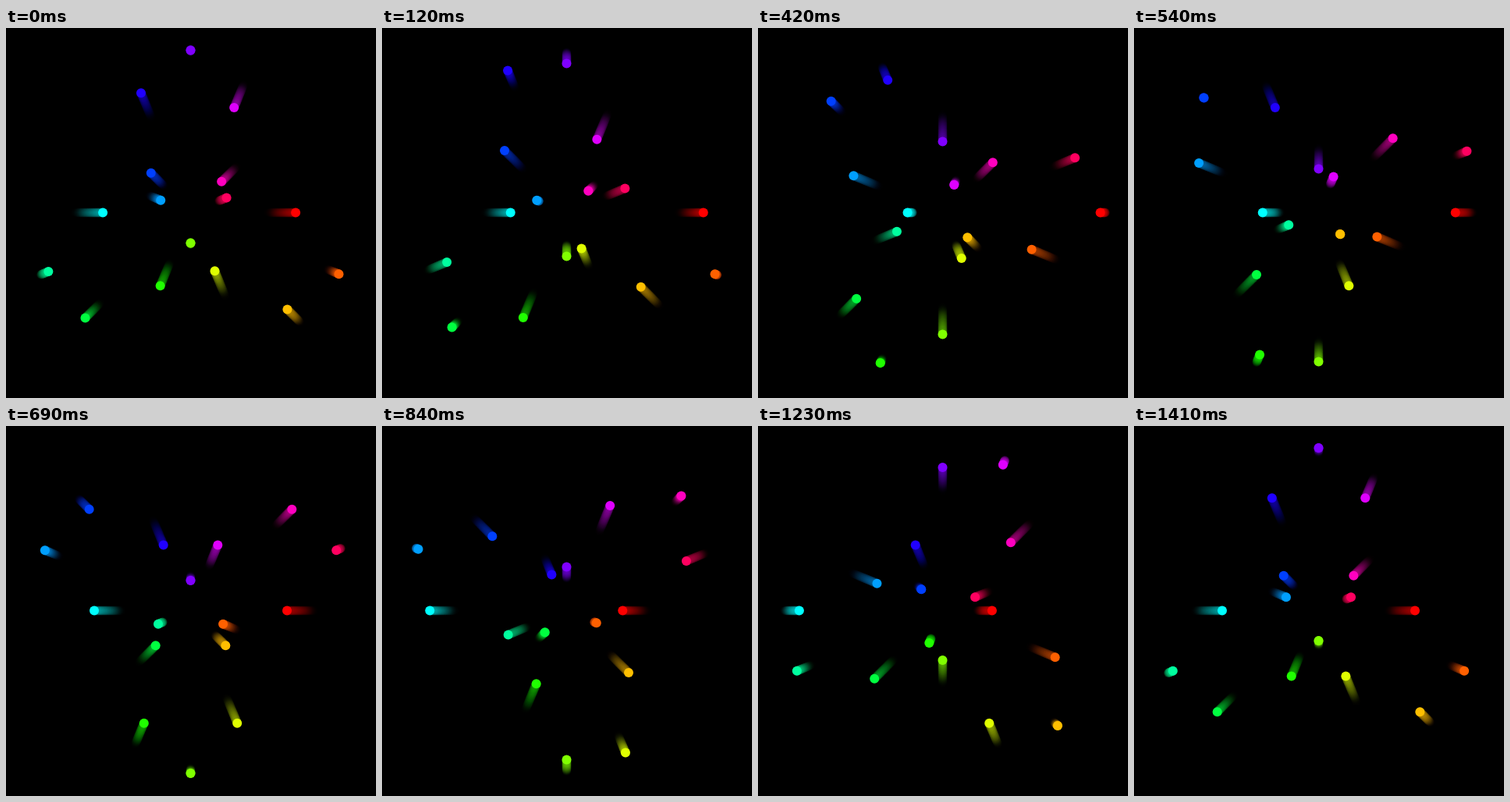
These frames come from a looping animation (474x474 px, 1.44 s). An HTML page with a canvas:

```html
<!DOCTYPE html>
<html lang="en">
<head>
<meta charset="utf-8">
<title>Pulsing ring of dots</title>
<style>
  html, body { margin: 0; width: 100%; height: 100%; overflow: hidden; background: #000; }
  canvas { display: block; width: 474px; height: 474px; }
</style>
</head>
<body>
<canvas id="stage" width="474" height="474"></canvas>
<script>
const ctx = document.getElementById('stage').getContext('2d');
const TAU = Math.PI * 2;
const SIZE = 474, CENTER = 236.5;
const LOOP = 1440, STEP = 30;
const DOTS = 16, DOT_RADIUS = 6;
const MEAN = 123.5, SWING = 85;
const TRAIL_MS = 100, TRAIL_SAMPLES = 33, TRAIL_ALPHA = 0.1;

function drawDot(k, time, alpha) {
  const angle = k / DOTS * TAU;
  const phase = (time + STEP) / LOOP * TAU + 3 * angle;
  const r = MEAN + SWING * Math.sin(phase);
  ctx.globalAlpha = alpha;
  ctx.beginPath();
  ctx.arc(CENTER + r * Math.cos(angle), CENTER + r * Math.sin(angle), DOT_RADIUS, 0, TAU);
  ctx.fill();
}

function draw(time) {
  ctx.globalAlpha = 1;
  ctx.fillStyle = '#000';
  ctx.fillRect(0, 0, SIZE, SIZE);
  for (let k = 0; k < DOTS; k++) {
    ctx.fillStyle = `hsl(${k * 360 / DOTS}, 100%, 50%)`;
    for (let i = TRAIL_SAMPLES; i > 0; i--) {
      const age = i / TRAIL_SAMPLES;
      drawDot(k, time - age * TRAIL_MS, TRAIL_ALPHA * (1 - age));
    }
    drawDot(k, time, 1);
  }
}

let start;
function frame(now) {
  start ??= now;
  draw(Math.floor((now - start) % LOOP / STEP) * STEP);
  requestAnimationFrame(frame);
}
draw(0);
requestAnimationFrame(frame);
</script>
</body>
</html>
```
